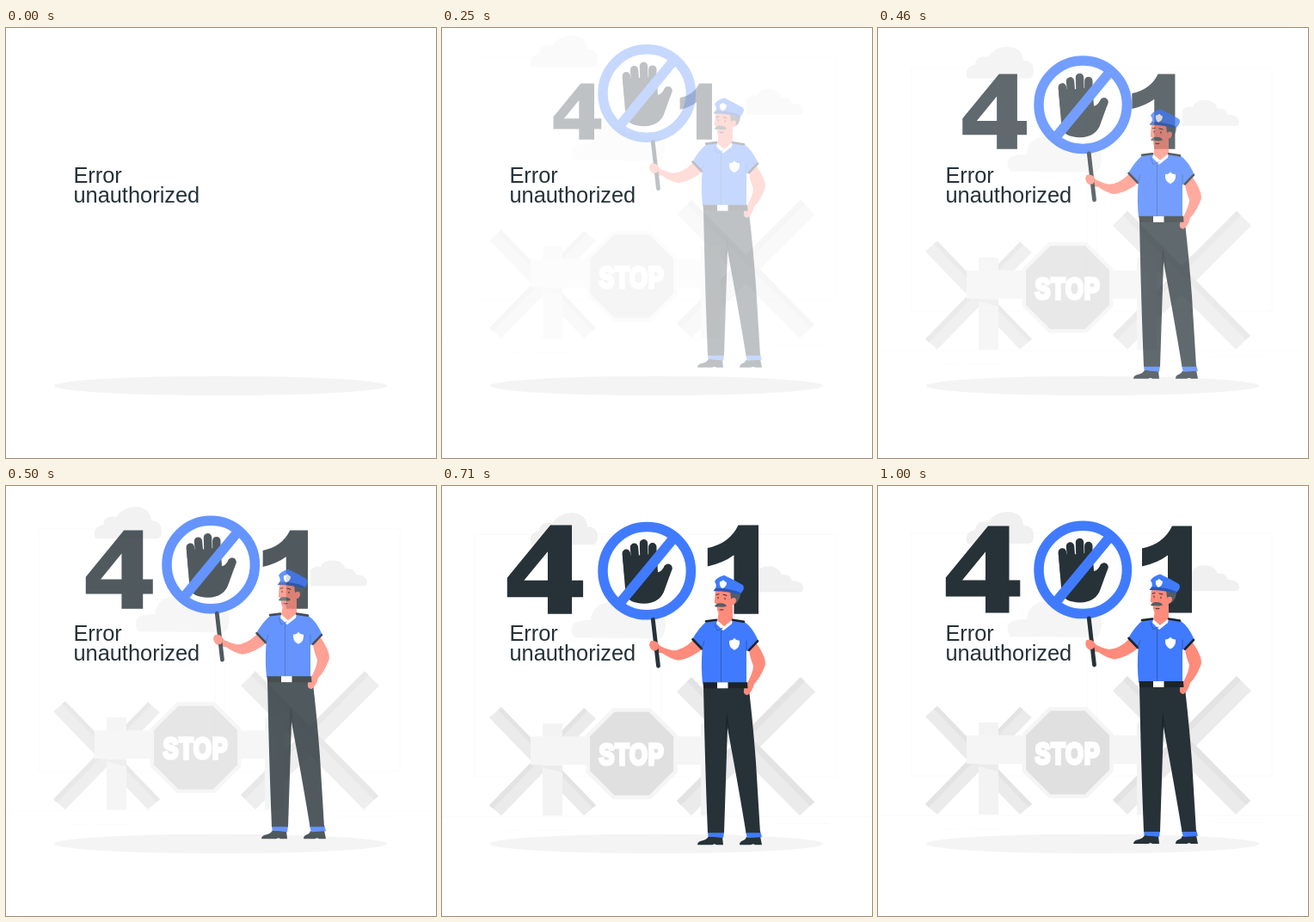
Recreate the animation shown at these times as an HTML page. Size 500x500 px, loop 1.04 s.

```html
<!DOCTYPE html>
<html lang="en">
<head>
<meta charset="utf-8">
<title>Error unauthorized</title>
<style>
  html, body { margin: 0; width: 100%; height: 100%; overflow: hidden; background: #fff; }
  svg { display: block; width: 100%; height: 100%; }
  text { font-family: "Liberation Sans", Arial, sans-serif; }
  .dark { fill: #263238; }
  .black { fill: #1b2428; }
  .blue { fill: #407bff; }
  .skin { fill: #ff8b7b; }
  .white { fill: #fff; }
  .hair { fill: #545e63; }
  .line { fill: none; stroke-linecap: round; stroke-linejoin: round; }
</style>
</head>
<body>
<svg viewBox="0 0 500 500">
  <ellipse cx="249.5" cy="416" rx="193.7" ry="11.3" fill="#f4f4f4"/>

  <!-- room and clouds -->
  <g class="slide">
    <path class="line" stroke="#fafafa" d="M39 55H243V337H39ZM255 55H458V337H255ZM0 383H500M75 399H92M106 399H146M388 391H450"/>
    <path fill="#f0f0f0" d="M104 67Q99 54 113 51Q114 39 128 42Q137 29 152 30Q168 31 169 46Q181 46 181 58Q181 66 176 67Z"/>
    <path fill="#f5f5f5" d="M154 175Q147 166 154 158Q164 154 173 155Q174 138 192 134Q208 133 214 144Q224 138 232 148L258 150Q262 160 258 171Q256 176 250 176Z"/>
    <path fill="#f0f0f0" d="M354 122V103Q360 98 366 100Q368 92 381 92Q392 93 395 102Q404 100 407 109Q419 109 420 117Q420 122 417 122Z"/>
  </g>

  <!-- barrier -->
  <g class="slide">
    <path fill="#ebebeb" d="M165 257L179 269L69 382L55 370Z"/>
    <path fill="#e3e3e3" d="M165 257L169 260L59 374L55 370Z"/>
    <path fill="#ebebeb" d="M69 256L55 268L165 382L179 370Z"/>
    <path fill="#e3e3e3" d="M69 256L65 259L175 373L179 370Z"/>
    <path fill="#ebebeb" d="M417 221L434 238L290 382L273 365Z"/>
    <path fill="#e3e3e3" d="M417 221L422 226L278 370L273 365Z"/>
    <path fill="#ebebeb" d="M290 221L273 238L416 382L433 366Z"/>
    <path fill="#e3e3e3" d="M290 221L285 226L428 371L433 366Z"/>
    <path fill="#f3f3f3" d="M117 275H140V382H117ZM301 275H324V382H301Z"/>
    <path fill="#ebebeb" d="M117 324H140V332L117 326Z"/>
    <path fill="#f5f5f5" d="M103 290H316V323H103Z"/>
    <path id="rim" fill="#f5f5f5"/>
    <path id="plate" fill="#e0e0e0"/>
    <g transform="translate(220.5 323) scale(.78 1)">
      <text text-anchor="middle" font-size="34.5" font-weight="700" letter-spacing="1" fill="#fff" stroke="#fff" stroke-width="3.6">STOP</text>
    </g>
  </g>

  <!-- digits -->
  <g id="digits" class="dark">
    <path fill-rule="evenodd" d="M128 46H152.5V109H165.3V128H152.5V147H125V128H78.8V106ZM125 76L98 109H125Z"/>
    <path d="M342 46H365V147H337V80Q325 89 307 93V72Q332 67 342 46Z"/>
  </g>

  <!-- officer -->
  <g class="slide">
    <path class="line" stroke="#263238" stroke-width="9.4" d="M214.3 77L217 105M223.5 70L226 100M234.5 65.5L235.5 100M244.8 69.5L245 100M263 94L254 116"/>
    <path class="dark" d="M209.7 78Q230 82 249.5 76L251 99Q256 98 259 91Q266 87 267.6 95L259 119Q254 135 235 135.5Q216 135 213.500 124Z"/>
    <path class="line" stroke="#407bff" stroke-width="11.5" d="M208.5 133L268 61"/>
    <circle cx="238.2" cy="97.4" r="51.2" fill="none" stroke="#407bff" stroke-width="11.5"/>

    <path class="skin" d="M292 178Q280 190 268 190Q260 188 254 185Q249 178 243 179Q240 183 243 188Q247 193 256 193Q266 200 275 201.5Q290 199 303 188Z"/>
    <path class="line" stroke="#263238" stroke-width="4.8" d="M245.3 154L251.5 208"/>
    <path class="skin" d="M242 180Q246 177 251 181L252 187Q249 192 244 189Q240 185 242 180Z"/>

    <!-- legs and shoes -->
    <path class="dark" d="M310 406L326 407L327 416H319L317 415L314 416H297Q297 412 303 411Q308 410 310 406ZM354 407L370 406L372 416H364L362 415L359 416H346Q346 412 350 411Q353 410 354 407Z"/>
    <path class="blue" d="M309 400L328 401L327 408L309.500 406ZM353 401L370 400L372 407L355 408Z"/>
    <path class="dark" d="M304 232H356.5Q361 268 365 320L370 402H353.5Q345 350 332 280L328 402H309Q306 330 304 232Z"/>
    <path class="black" d="M331 262L329 300L332 274L336 292Z"/>

    <!-- arm on the hip -->
    <path class="skin" d="M366 182Q378 200 375.5 208Q370 222 363 229Q361 238 355 242Q350 241 351 236Q351 230 356 226Q362 214 362 208Q358 198 357 190Z"/>

    <!-- shirt -->
    <path class="skin" d="M322 144L338 138L338 157L328 166L320 157Z"/>
    <path class="blue" d="M320 155L308 156Q299 163 291 177L302.5 189Q301 210 303 228H354V190L357 191L368 179Q361 163 352 157L338 155L328 164Z"/>
    <path class="white" d="M320 155L328 162L338 154L337 159L327 167L319 159Z"/>
    <path class="line" stroke="#1b2428" stroke-width="2.6" d="M307 156L319 154.5M338 154.5L351 156.5M291.5 177L302 188M357 189.5L367 179"/>
    <path class="line" stroke="#2d56b3" stroke-width=".9" d="M324.5 167V227M317 159L320 167L326 164M302 188L305 179M354 190V179"/>
    <path class="white" d="M334 178.500Q338 178.500 340 175.5Q342 178.500 346 178.500Q347 186.500 340 189.5Q333 186.500 334 178.500Z"/>
    <path class="black" d="M303.5 227H355L355.5 234H304Z"/>
    <path class="white" d="M320 227H332.5V234H320Z"/>

    <!-- head -->
    <path class="hair" d="M332 120L347 123Q347 131 342 135L335 136Z"/>
    <path class="skin" d="M318 119L335 121L336 130Q341 127 342 131Q342 136 338 137Q337 148 329 150Q322 150 320 143L320 136Q316 136 317 132Z"/>
    <path class="hair" d="M317 138.5Q319 134.5 324 135Q330 135 331 138.5Q326 140 322 139Q319 140 317 138.5Z"/>
    <path class="line" stroke="#263238" stroke-width="1" d="M319 125L322 124.500M327 125L331 126M321 128V129.5M329 129V130.5M323 142.5Q325 143.5 327 142.5"/>
    <path class="blue" d="M317 110Q319 105 328 102.5Q338 107 350 114Q353 118 347 124L318 118Q320 114 317 110Z"/>
    <path fill="#2d56b3" d="M318 117.5Q334 117 347.5 123L345 125Q330 120.5 315.5 121Z"/>
    <path class="white" d="M323 110Q325 110 327 108Q329 110 331 111Q331 116 326 118Q322 115 323 110Z"/>
  </g>

  <text class="dark" font-size="25.4"><tspan x="78.4" y="180.2">Error</tspan><tspan x="78.4" y="203">unauthorized</tspan></text>
</svg>
<script>
  const LOOP = 1040, STEP = 1000 / 24, LEAD = 33;
  const slides = document.querySelectorAll('.slide');
  const digits = document.getElementById('digits');

  // Regular octagon with the given half width
  function octagon(id, half) {
    const points = Array.from({ length: 8 }, (_, i) => {
      const a = (i + .5) * Math.PI / 4, r = half / Math.cos(Math.PI / 8);
      return `${220.6 + r * Math.cos(a)} ${310 + r * Math.sin(a)}`;
    });
    document.getElementById(id).setAttribute('d', `M${points.join('L')}Z`);
  }
  octagon('rim', 53);
  octagon('plate', 48.5);

  const bezier = (u, a, b) => 3 * u * (1 - u) ** 2 * a + 3 * u * u * (1 - u) * b + u ** 3;

  // cubic-bezier(.36, -.01, .5, 1.38)
  function ease(x) {
    if (x >= 1) return 1;
    let lo = 0, hi = 1;
    for (let i = 0; i < 24; i++) {
      const mid = (lo + hi) / 2;
      if (bezier(mid, .36, .5) < x) lo = mid; else hi = mid;
    }
    return bezier(lo, -.01, 1.38);
  }

  function draw(time) {
    // The motion runs at 24 steps a second
    const step = Math.floor((time % LOOP + 4) / STEP);
    const p = step < 2 ? 0 : ease((step * STEP + LEAD) / 1000);
    const opacity = Math.min(1, Math.max(0, p));
    for (const g of slides) {
      g.setAttribute('transform', `translate(0 ${-30 * (1 - p)})`);
      g.setAttribute('opacity', opacity);
    }
    digits.setAttribute('transform', `translate(221.5 97.1) scale(${.5 + p / 2}) translate(-221.5 -96.5)`);
    digits.setAttribute('opacity', opacity);
  }

  const start = performance.now();
  function tick() {
    draw(performance.now() - start);
    requestAnimationFrame(tick);
  }
  tick();
</script>
</body>
</html>
```
